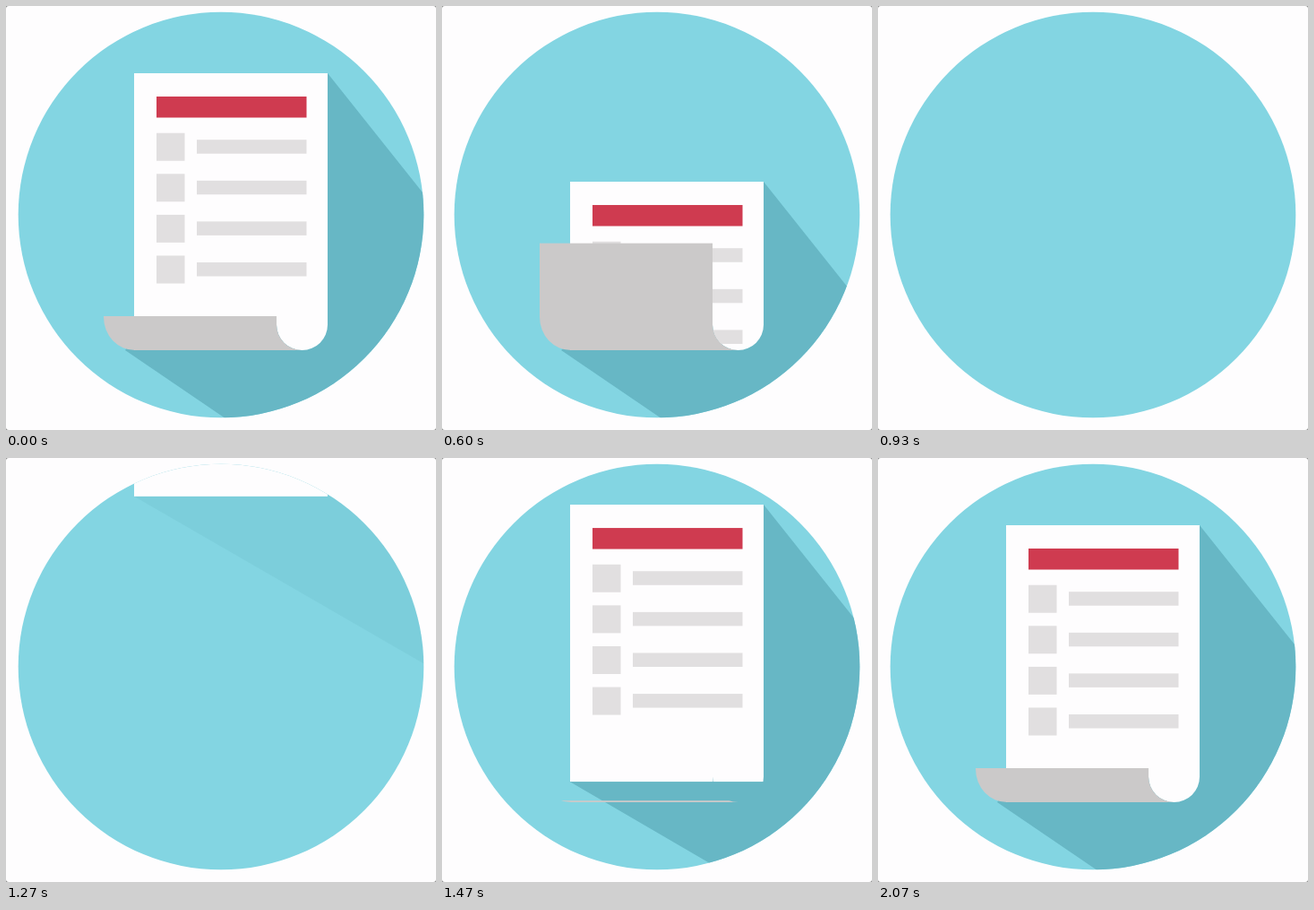
Recreate the animation shown at these times as an HTML page with a canvas. Size 480 by 473 pixels, loop 2140 ms.

```html
<!DOCTYPE html>
<html lang="en">
<head>
<meta charset="utf-8">
<title>Scrolling checklist</title>
<style>
  html, body { margin: 0; width: 100%; height: 100%; overflow: hidden; background: #8c8c8c; }
  canvas { display: block; width: 480px; height: 473px; }
</style>
</head>
<body>
<canvas id="stage" width="480" height="473"></canvas>
<script>
const ctx = document.getElementById('stage').getContext('2d');
const LOOP = 2140, STEP = 200 / 3;
const FLOOR = 384, TOP = 75, SHEET = 309, BACK = 307, CURL = 38;
const LEFT = 143, RIGHT = 359, FOLD = 302, ROLL_X = 330.5, ROLL_Y = 355.5, ROLL_R = 28.5;
const COLOR = {
  paper: '#fefdfe', disc: '#83d5e2', shade: '#67b7c5',
  back: '#cbc9c9', bar: '#e1dfe0', title: '#cf3b50'
};

const clamp = v => Math.min(1, Math.max(0, v));
const span = (t, a, b) => clamp((t - a) / (b - a));
const mix = (a, b, k) => a + (b - a) * k;

function rect(x, y, w, h, color) {
  ctx.fillStyle = color;
  ctx.fillRect(x, y, w, h);
}

function clipped(path, draw) {
  ctx.save();
  ctx.clip(path);
  draw();
  ctx.restore();
}

const page = new Path2D();
page.roundRect(0, 0, 480, 473, 3);

const disc = new Path2D();
disc.arc(240, 233, 226.3, 0, Math.PI * 2);

// Where the front of the sheet may show: it ends in the round roll at the lower right.
const frontArea = new Path2D(
  `M${LEFT} -400H${RIGHT}V${ROLL_Y}A${ROLL_R} ${ROLL_R} 0 0 1 ${ROLL_X} ${FLOOR}` +
  `A${ROLL_R} ${ROLL_R} 0 0 1 ${FOLD} ${ROLL_Y}V${FLOOR}H${LEFT}Z`);

// Where the back may show: rounded lower left, hugging the roll on the right.
const backArea = new Path2D(
  `M109 -400H${FOLD}V${ROLL_Y}A${ROLL_R} ${ROLL_R} 0 0 0 ${ROLL_X} ${FLOOR}` +
  `H144A35 37 0 0 1 109 347Z`);

// Pose: slide of the front, height of the back, curl amount, shadow strength.
function pose(t) {
  if (t < 1100) {
    const slide = 0.00257 * Math.max(0, t - 383) ** 2;
    return {
      slide, curl: 1,
      back: Math.max(CURL, slide * 0.986),
      shade: 1 - span(t, 600, 750)
    };
  }
  const slide = -0.00468 * Math.max(0, 1540 - t) ** 2;
  const curl = 1 - (1 - span(t, 1467, 1590)) ** 2;
  return {
    slide, curl,
    back: t < 1460 ? 0 : Math.max(1.5, CURL * curl),
    shade: span(t, 1230, 1400)
  };
}

function drawShadow({ slide, curl, shade }) {
  if (!shade) return;
  const y = Math.min(TOP + slide, FLOOR);
  const x = mix(RIGHT, 322, span(y, 340, FLOOR));
  const baseX = mix(LEFT, 133, curl);
  const baseY = Math.min(FLOOR, TOP + SHEET + slide);
  const slope = mix(0.577, 0.68, curl);
  ctx.globalAlpha = shade;
  ctx.fillStyle = COLOR.shade;
  ctx.beginPath();
  ctx.moveTo(x, y);
  ctx.lineTo(x + 400, y + 502);
  ctx.lineTo(baseX + 400, baseY + 400 * slope);
  ctx.lineTo(baseX, baseY);
  ctx.fill();
  ctx.globalAlpha = 1;
}

function drawFront(slide) {
  const y = TOP + slide;
  rect(LEFT, y, RIGHT - LEFT, SHEET, COLOR.paper);
  rect(168, y + 26, 167.5, 23.5, COLOR.title);
  for (let i = 0; i < 4; i++) {
    const row = y + 66.7 + i * 45.6;
    rect(168, row, 31.5, 31, COLOR.bar);
    rect(213, row + 7.5, 122.5, 15.5, COLOR.bar);
  }
}

function draw(t) {
  const p = pose(t);
  ctx.clearRect(0, 0, 480, 473);
  ctx.fillStyle = COLOR.paper;
  ctx.fill(page);
  ctx.fillStyle = COLOR.disc;
  ctx.fill(disc);
  clipped(disc, () => {
    drawShadow(p);
    if (p.slide < SHEET) clipped(frontArea, () => drawFront(p.slide));
    if (p.back) clipped(backArea, () => rect(100, FLOOR - p.back, 240, BACK, COLOR.back));
  });
}

const start = performance.now();
function tick() {
  const t = (performance.now() - start) % LOOP;
  const step = Math.min(31, Math.floor((t + 4) / STEP));
  draw(Math.round(step * STEP / 10) * 10);
  requestAnimationFrame(tick);
}
tick();
</script>
</body>
</html>
```
